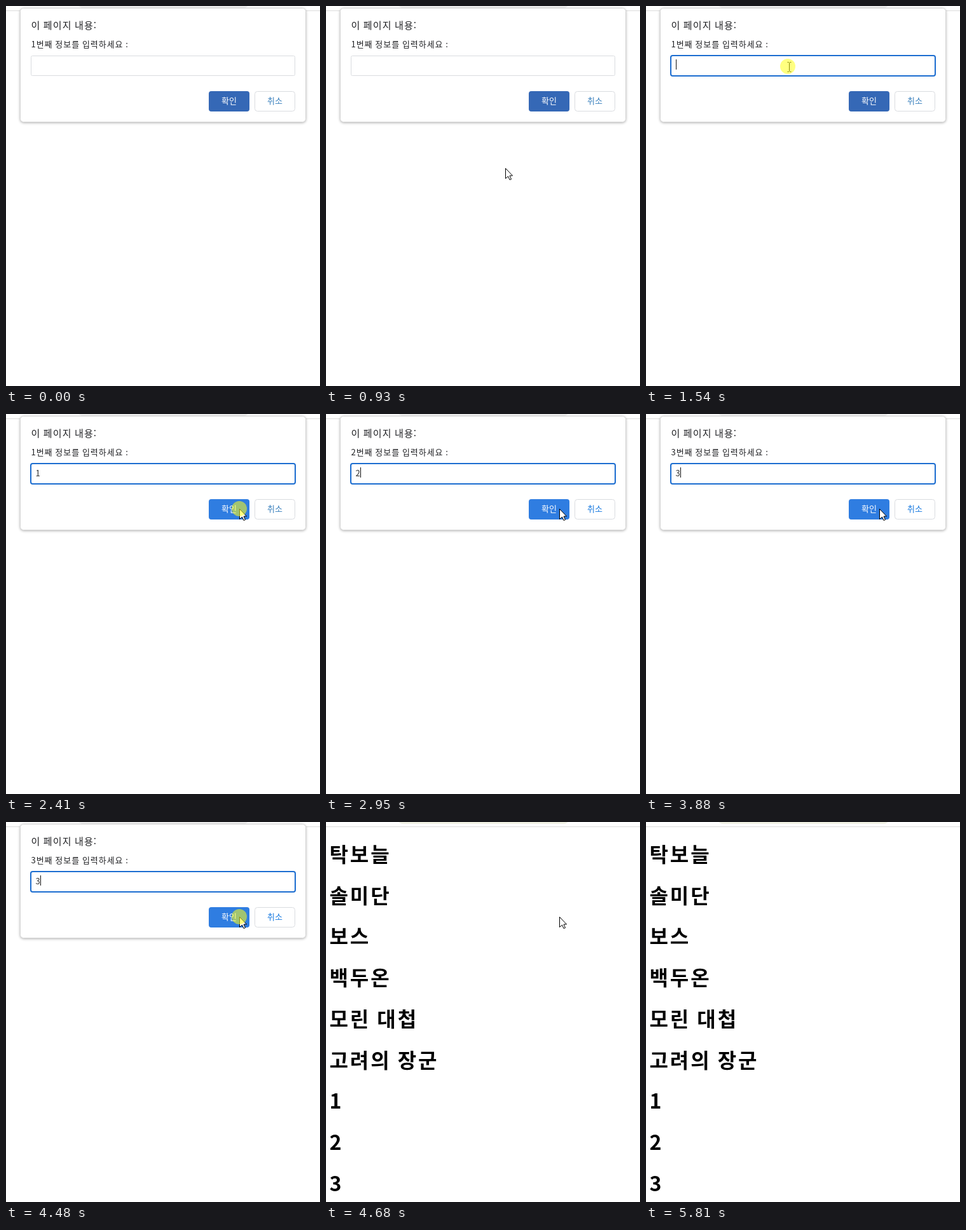
Recreate the animation shown at these times as an HTML page with a canvas. Size 494 by 598 pixels, loop 6140 ms.

```html
<!DOCTYPE html>
<html lang="ko">
<head>
<meta charset="utf-8">
<title>Prompt demo</title>
<style>
html, body { margin: 0; width: 100%; height: 100%; overflow: hidden; background: #fff; }
canvas { display: block; }
</style>
</head>
<body>
<canvas id="stage" width="494" height="598"></canvas>
<script>
const ctx = document.getElementById('stage').getContext('2d');
const FONT = '"Noto Sans CJK KR", "Noto Sans CJK", sans-serif';
const LOOP = 6140, STEP = 67.5, PAGE_AT = 4680;
const LINES = ['탁보늘', '솔미단', '보스', '백두온', '모린 대첩', '고려의 장군', '1', '2', '3'];
const PROMPTS = [
  { n: 1, type: 1860, close: 2480 },
  { n: 2, type: 2950, close: 3490 },
  { n: 3, type: 3880, close: 4540 }
];
const CLICKS = [
  { x: 223, y: 95, from: 1470, to: 1600 },
  ...PROMPTS.map(p => ({ x: 367, y: 149, from: p.close - 200, to: p.close }))
];

const within = (t, a, b) => t >= a && t < b;
const easeOut = u => 1 - (1 - u) ** 2;
const easeIn = u => u * u;

function text(str, x, y, size, color, { weight = 400, gap = 0, align = 'left' } = {}) {
  ctx.font = `${weight} ${size}px ${FONT}`;
  ctx.letterSpacing = gap + 'px';
  ctx.textAlign = align;
  ctx.fillStyle = color;
  ctx.fillText(str, x, y);
}

function box(x, y, w, h, r, fill, stroke, line = 1) {
  ctx.beginPath();
  const i = stroke ? line / 2 : 0;
  ctx.roundRect(x + i, y + i, w - 2 * i, h - 2 * i, r);
  if (fill) { ctx.fillStyle = fill; ctx.fill(); }
  if (stroke) { ctx.strokeStyle = stroke; ctx.lineWidth = line; ctx.stroke(); }
}

function glide(t, start, end, from, to, ease) {
  const u = Math.min(1, Math.floor((t - start) / STEP + 0.03) * STEP / (end - start));
  const k = ease(Math.max(0, u));
  return { x: from[0] + (to[0] - from[0]) * k, y: from[1] + (to[1] - from[1]) * k };
}

function pointer(t) {
  if (t < 790 || t >= 5810) return null;
  if (t < 1330) return glide(t, 790, 1127, [395, 514], [218, 110], easeOut);
  if (t < 1860) return { x: 225, y: 96, beam: true };
  if (t < 5340) {
    const p = glide(t, 1860, 2265, [225, 96], [367, 149], easeOut);
    p.beam = p.y < 111;
    return p;
  }
  return glide(t + STEP, 5340, 5812, [367, 149], [440, 592], easeIn);
}

function drawPointer({ x, y, beam }) {
  x = Math.round(x);
  y = Math.round(y);
  ctx.save();
  ctx.translate(x + 0.5, y + 0.5);
  ctx.strokeStyle = '#000';
  ctx.lineWidth = 1;
  ctx.beginPath();
  if (beam) {
    ctx.moveTo(-3, -8); ctx.lineTo(-1, -8); ctx.lineTo(0, -7);
    ctx.lineTo(1, -8); ctx.lineTo(3, -8);
    ctx.moveTo(0, -7); ctx.lineTo(0, 6);
    ctx.moveTo(-3, 7); ctx.lineTo(-1, 7); ctx.lineTo(0, 6);
    ctx.lineTo(1, 7); ctx.lineTo(3, 7);
  } else {
    [[0, 0], [0, 16], [4, 12.5], [6.5, 18], [9, 17], [6.5, 11.5], [11, 11.5]]
      .forEach(p => ctx.lineTo(...p));
    ctx.closePath();
    ctx.fillStyle = '#fff';
    ctx.fill();
  }
  ctx.stroke();
  ctx.restore();
}

function drawDialog(t, p, alpha, hover) {
  ctx.save();
  ctx.globalAlpha = alpha;
  ctx.save();
  ctx.shadowColor = 'rgba(0,0,0,.38)';
  ctx.shadowBlur = 4;
  ctx.shadowOffsetY = 1;
  box(22.5, 3.5, 449, 179, 5, '#fff');
  ctx.restore();
  box(22, 3, 450, 180, 5, '#fff', '#d8d8d8');

  text('이 페이지 내용:', 39.5, 36, 15, '#202124', { gap: 1.1 });
  text(`${p.n}번째 정보를 입력하세요 :`, 39.5, 65, 13, '#202124', { gap: 0.95 });

  const focus = t >= 1470;
  if (focus) box(38, 77, 418, 34, 3, '#fff', '#1c6dd0', 2);
  else box(39, 78, 416, 32, 2, '#fff', '#dadce0');
  const typed = t >= p.type;
  if (typed) text(String(p.n), 46.5, 98, 13, '#333');
  if (focus && !(p.n === 1 && t >= 2060)) {
    ctx.fillStyle = '#111';
    ctx.fillRect(typed ? 54 : 47, 84, 1, 16);
  }

  box(319, 134, 64, 32, 4, hover ? '#2f7de1' : '#3568b6');
  text('확인', 351, 154, 13, '#fff', { weight: 500, align: 'center' });
  box(391, 134, 64, 32, 4, '#fff', '#dadce0');
  text('취소', 423, 154, 13, p.n === 1 ? '#3a80bd' : '#1a7be0', { align: 'center' });
  ctx.restore();
}

function drawPage(t) {
  ctx.fillStyle = '#fff';
  ctx.fillRect(0, 0, 494, 598);
  ctx.fillStyle = '#dcdcdc';
  ctx.fillRect(0, 7, 494, 1);
  box(113, -20, 269, 23, 8, t >= PAGE_AT ? '#f0f1e4' : '#f1f1f1');
  if (t >= PAGE_AT) {
    LINES.forEach((s, i) => text(s, 5.5, 63 + i * 64.7, 32, '#000', { weight: 700, gap: 2.9 }));
  }
}

function drawPrompt(t, hover) {
  let i = 0;
  while (i < 2 && t >= PROMPTS[i].close + 65) i++;
  const p = PROMPTS[i];
  const since = i ? t - PROMPTS[i - 1].close : Infinity;
  let alpha = 1;
  if (t >= p.close) alpha = t < p.close + 65 ? 0.5 : 0;
  else if (since < 130) alpha = 0;
  else if (since < 190) alpha = 0.5;
  if (alpha) drawDialog(t, p, alpha, hover);
}

function draw(t) {
  const at = pointer(t);
  drawPage(t);
  if (t < PAGE_AT) drawPrompt(t, at && within(at.x, 319, 383) && within(at.y, 134, 166));
  if (at) drawPointer(at);
  const click = CLICKS.find(c => within(t, c.from, c.to));
  if (click) {
    ctx.beginPath();
    ctx.arc(click.x, click.y, 12, 0, 7);
    ctx.fillStyle = 'rgba(255,255,24,.55)';
    ctx.fill();
  }
}

const start = performance.now();
function tick() {
  draw((performance.now() - start) % LOOP);
  requestAnimationFrame(tick);
}
tick();
</script>
</body>
</html>
```
